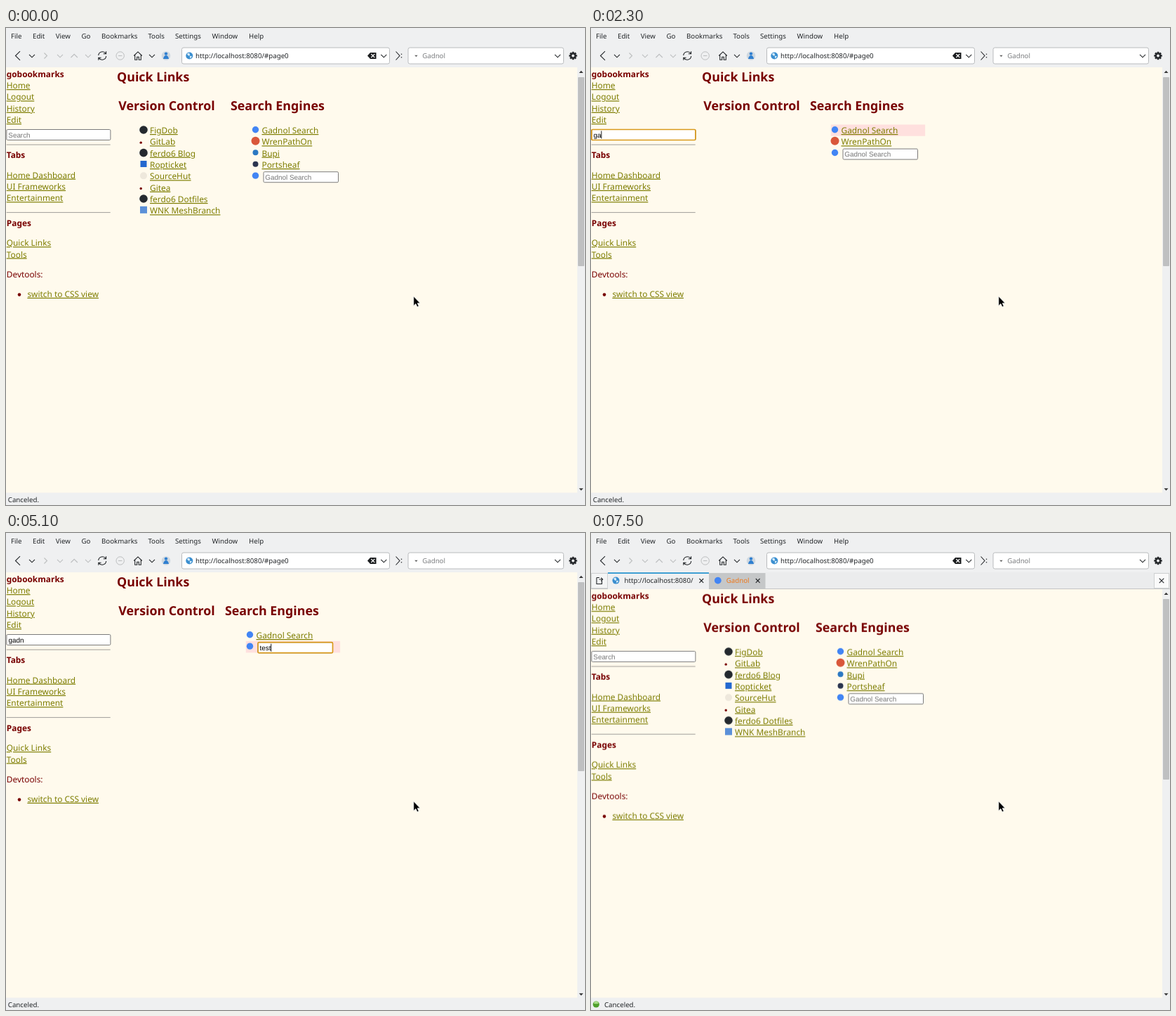
An HTML page that plays this animation: 825x679 px, repeating every 8000 ms.

```html
<!DOCTYPE html>
<html lang="en">
<head>
<meta charset="utf-8">
<title>Bookmark filter</title>
<style>
html, body { margin: 0; width: 100%; height: 100%; overflow: hidden; background: #eff0f1; }
svg { display: block; width: 825px; height: 679px; }
text { font: 11.88px "Noto Sans", sans-serif; fill: #780000; text-rendering: geometricPrecision; white-space: pre; }
.ui { font-size: 9.7px; fill: #232629; }
.hint { fill: #7c7e80; }
.unread { fill: #f07818; }
.key { text-decoration: underline; }
.link { fill: #7d7d00; text-decoration: underline; }
.bold { font-weight: 700; }
.head { font-weight: 700; font-size: 17.82px; }
.type { font: 9.9px "Liberation Sans", Arial, sans-serif; fill: #000; }
.empty { fill: #757575; }
.line { fill: none; stroke: #232629; stroke-width: 1.1; }
.off { stroke: #bcbebf; }
</style>
</head>
<body>
<svg id="stage" viewBox="0 0 825 679"></svg>
<script>
const LOOP = 8000, ROW = 16.335, FIRST = 150, SHIFT = 23.76;
const OPEN = 5400, RESET = 7100;
const steps = [];

// markup helpers
const text = (x, y, s, cls = '') => `<text x="${x}" y="${y}" class="${cls}">${s}</text>`;
const rect = (x, y, w, h, fill, more = '') => `<rect x="${x}" y="${y}" width="${w}" height="${h}" fill="${fill}" ${more}/>`;
const disc = (x, y, r, fill, more = '') => `<circle cx="${x}" cy="${y}" r="${r}" fill="${fill}" ${more}/>`;
const line = (d, cls = '', more = '') => `<path d="${d}" class="line ${cls}" ${more}/>`;
const shape = (d, fill, more = '') => `<path d="${d}" fill="${fill}" ${more}/>`;
const chevron = (x, cls) => line(`M${x - 4} 37.8l4 4l4-4`, cls);
const cross = (x, y, r, cls = '') => line(`M${x - r} ${y - r}l${2 * r} ${2 * r}m0-${2 * r}l-${2 * r} ${2 * r}`, cls);

// a group whose property holds each value from its time on
function timed(body, prop, table) {
  steps.push([prop, table]);
  return `<g data-step="${steps.length - 1}">${body}</g>`;
}
function during(body, ...spans) {
  const table = spans[0] ? [[0, 0]] : [];
  spans.forEach((t, i) => { if (t < LOOP) table.push([t, i % 2 ? 0 : 1]); });
  return timed(body, 'opacity', table);
}

const box = (x, y, w) => rect(x, y, w, 15, '#fff', 'stroke="#7b7b7b" rx="1.5"');
const ring = (x, y, w) => rect(x, y, w, 15, 'none', 'stroke="#d99a1c" stroke-width="1.7" rx="1.5"');
const caret = (x, y, ...spans) => during(rect(x, y, .9, 11, '#000'), ...spans);
const glow = (x, y, w, h) => rect(x, y, w, h, '#ffe0de');
const globe = (x, y) => disc(x, y, 5, '#3b8fd0') +
  shape(`M${x - 3.5} ${y - 2.5}q3-3 4 0t-2 2.5zM${x + .5} ${y + .5}q3-1 3 1l-2.5 2.5z`, '#d5ebf8');

const ICON = {
  fig: y => disc(0, y - 5, 5.8, '#24292f'),
  dot: y => disc(-3.8, y - 3.2, 1.7, '#780000'),
  rope: y => rect(-4.5, y - 10, 9, 9, '#2468cf'),
  pale: y => disc(0, y - 5, 5, '#eee8dc'),
  mesh: y => rect(-5, y - 10.5, 10, 10, '#5b90d8'),
  gad: y => disc(0, y - 5.2, 4.7, '#4285f4'),
  wren: y => disc(0, y - 5.6, 6, '#d9573a'),
  bup: y => disc(0, y - 5.3, 4, '#2b78c2'),
  port: y => disc(0, y - 5.3, 4, '#2b3550')
};
const FIG = ['fig', 'FigDob'], LAB = ['dot', 'GitLab'], BLOG = ['fig', 'ferdo6 Blog'],
  ROPE = ['rope', 'Ropticket'], HUT = ['pale', 'SourceHut'], TEA = ['dot', 'Gitea'],
  DOTS = ['fig', 'ferdo6 Dotfiles'], MESH = ['mesh', 'WNK MeshBranch'];
const GAD = ['gad', 'Gadnol Search'], WREN = ['wren', 'WrenPathOn'], BUP = ['bup', 'Bupi'],
  PORT = ['port', 'Portsheaf'], ASK = ['gad'];

const list = (x, rows) => `<g transform="translate(${x})">` + rows.map(([icon, label], i) => {
  const y = FIRST + ROW * i;
  return ICON[icon](y) + (label ? text(9, y, label, 'link') : box(11.5, y - 10.6, 106.5));
}).join('') + '</g>';
const engines = (x, rows) => text(x - 35.5, 117.4, 'Search Engines', 'head') + list(x, rows);
const prompt = (x, y, ...spans) => during(text(x, y, 'Gadnol Search', 'type empty'), ...spans);

function typing(x, y, table) {
  return table.map(([from, to, s]) => during(text(x, y, s, 'type'), from, to)).join('');
}

function menu() {
  const items = [['File', 7], ['Edit', 38], ['View', 70.7], ['Go', 107.5], ['Bookmarks', 136],
    ['Tools', 202.4], ['Settings', 241], ['Window', 293.5], ['Help', 346]];
  return items.map(([s, x]) => text(x, 15, s, 'ui')).join('') +
    during(items.map(([s, x]) => text(x, 15, s[0], 'ui key')).join(''), 800, 1300);
}

function toolbar() {
  const field = (x, w) => rect(x, 28, w, 23, '#fff', 'stroke="#b9bbbd" rx="2.5"');
  const teeth = [0, 45, 90, 135].map(a =>
    rect(806.7, 33.8, 2.6, 11.4, '#232629', `transform="rotate(${a} 808 39.5)"`)).join('');
  return line('M20 33.2l-6.5 6.3l6.5 6.3') + chevron(37) +
    line('M54.5 35.5l4 4l-4 4', 'off') + chevron(77, 'off') +
    line('M92.5 42l4.7-4.7l4.7 4.7', 'off') + chevron(117, 'off') +
    line('M131.7 39a5.7 5.7 0 0 1 10.5-2.6m.4-3.2v3.6h-3.8M142.7 40a5.7 5.7 0 0 1-10.5 2.6m-.4 3.2v-3.6h3.8', '', 'stroke-width="1.3"') +
    disc(162.7, 39.5, 5.7, 'none', 'stroke="#bcbebf"') + line('M160 39.5h5.4', 'off') +
    line('M182.2 39.5l5.8-5.6l5.8 5.6M183.7 38.5v6.8h3v-4h2.6v4h3v-6.8') + chevron(208) +
    disc(228, 39.5, 6.3, '#cfd8e0') + disc(228, 36.6, 2.2, '#2f7fd0') +
    shape('M224 44q1-5 4-5t4 5z', '#2f7fd0') +
    field(250.5, 296) + globe(261.3, 39.5) + text(270, 43.3, 'http://localhost:8080/#page0', 'ui') +
    shape('M515 39.5l4-4.6h8.5v9.2h-8.5z', '#1b1d1f') +
    line('M520.3 37l5 5m0-5l-5 5', '', 'style="stroke:#fff"') + chevron(538.3) +
    line('M555.5 33.5l5.5 6l-5.5 6') + disc(563.5, 37.3, .8, '#232629') + disc(563.5, 41.7, .8, '#232629') +
    field(573, 221.5) + shape('M582.2 38.7h4.4l-2.2 2.4z', '#555') +
    text(593.2, 43.3, 'Gadnol', 'ui hint') + chevron(786) +
    teeth + disc(808, 39.5, 4.3, '#232629') + disc(808, 39.5, 1.9, '#eff0f1');
}

function sidebar() {
  const links = [['Home', 86.1], ['Logout', 102.4], ['History', 118.8], ['Edit', 135.1],
    ['Home Dashboard', 213.6], ['UI Frameworks', 229.9], ['Entertainment', 246.3],
    ['Quick Links', 310.2], ['Tools', 326.5]];
  const rule = y => rect(.7, y, 148, 1, '#a09e99');
  return text(.75, 69.8, 'gobookmarks', 'bold') + text(.75, 185.3, 'Tabs', 'bold') +
    text(.75, 282, 'Pages', 'bold') + links.map(([s, y]) => text(.75, y, s, 'link')).join('') +
    rule(165.6) + rule(262.1) + text(.75, 354.7, 'Devtools:') +
    disc(19, 379.6, 2.3, '#780000') + text(30.4, 382.9, 'switch to CSS view', 'link') +
    box(.9, 144.5, 148) + during(ring(.9, 144.5, 148), 1300, 4400) +
    during(text(3.3, 155.6, 'Search', 'type empty'), 0, 1800, RESET, LOOP) +
    typing(3.5, 155.6, [[1800, 2100, 'g'], [2100, 3200, 'ga'], [3200, 3400, 'gad'], [3400, RESET, 'gadn']]) +
    [[1300, 1800], [1800, 2100], [2100, 2800], [3200, 3400], [3400, 3900]]
      .map((span, i) => caret(3.4 + 5.5 * i, 146.5, ...span)).join('');
}

function results() {
  const near = 347.5, far = 355.5, all = [GAD, WREN, BUP, PORT, ASK];
  return text(158, 75.7, 'Quick Links', 'head') + text(160.3, 117.4, 'Version Control', 'head') +
    during(list(196, [FIG, LAB, BLOG, ROPE, HUT, TEA, DOTS, MESH]) + engines(far, all) +
      text(369.3, 215.6, 'Gadnol Search', 'type empty'), 0, 1800, RESET, LOOP) +
    during(glow(190.3, 137.5, 107.5, 16.3) + list(196, [FIG, LAB, BLOG, ROPE, TEA, DOTS]) +
      engines(near, all) + text(361.3, 215.6, 'Gadnol Search', 'type empty'), 1800, 2100) +
    during(glow(341.8, 137.5, 134.3, 16.3), 2100, 4200) +
    during(glow(341.8, 153.8, 134.3, 16.6), 4200, RESET) +
    during(engines(near, [GAD, WREN, ASK]) + text(361.3, 183, 'Gadnol Search', 'type empty'), 2100, 3200) +
    during(engines(near, [GAD, ASK]), 3200, RESET) +
    during(ring(359, 155.7, 106.5), 4400, RESET) +
    prompt(361.3, 166.6, 3200, 4900, OPEN, RESET) +
    typing(361.5, 166.6, [[4900, 5000, 'te'], [5000, 5100, 'tes'], [5100, OPEN, 'test']]) +
    caret(361.2, 157.7, 4400, 4900, OPEN, 6100, 6600, RESET) +
    caret(369.8, 157.7, 4900, 5000) + caret(374.7, 157.7, 5000, 5100) + caret(377.3, 157.7, 5100, OPEN);
}

function tabs() {
  return rect(0, 56, 825, 24, '#ebeced') + rect(0, 79, 825, 1, '#c3c5c6') +
    rect(.5, 57.5, 23, 21, '#f4f5f5', 'stroke="#cfd1d2"') +
    line('M8 63.5h4m-4 0v9h7.5v-4.5M11.5 66h5m-2.2-2.4l2.4 2.4l-2.4 2.4') +
    rect(24, 57, 144, 23, '#eff0f1') + rect(24, 56, 144, 2, '#3f9fd3') +
    globe(35.5, 67.6) + text(47.5, 71.4, 'http://localhost:8080/', 'ui') + cross(157.3, 67.9, 2.9) +
    rect(168, 57, 80.5, 22, '#c5c7c8') + disc(180.8, 67.6, 4.9, '#4285f4') +
    text(192.8, 71.4, 'Gadnol', 'ui unread') + cross(237.7, 67.9, 2.9) +
    rect(802.5, 57.5, 21, 21, '#fafafa', 'stroke="#cfd1d2"') + cross(813, 67.9, 3.3);
}

function scrollbar() {
  const bar = (top, h) => rect(814, top, 11, 661.5 - top, '#eff0f1') +
    shape(`M816.5 ${top + 8}h6l-3-3.2z`, '#333') +
    rect(815, top + 14, 9, h, '#bfc0c1', 'rx="1"');
  return during(bar(56, 269), 0, OPEN) + during(bar(80, 257), OPEN, LOOP) +
    shape('M816.5 655.3h6l-3 3.2z', '#333');
}

function status() {
  return during(text(2.8, 674.7, 'Canceled.', 'ui'), 0, OPEN) +
    during(disc(7.3, 671, 4.6, '#4f9f2c') + shape('M3.8 669.5a3.6 3.6 0 0 1 7 0q-3.5 1.7-7 0z', '#a8dc86') +
      text(19, 674.7, 'Canceled.', 'ui'), OPEN, LOOP);
}

const pointer = shape('M580.8 382v13.4l3.1-2.8l2 4.5l2.3-1l-2-4.3h3.9z', '#000', 'stroke="#fff" stroke-width=".7"');

const stage = document.getElementById('stage');
stage.innerHTML = rect(0, 0, 825, 679, '#eff0f1') + menu() + toolbar() +
  rect(0, 56, 814, 605.5, '#fffaed') +
  timed(sidebar() + results(), 'transform', [[0, 'translateY(0px)'], [OPEN, `translateY(${SHIFT}px)`]]) +
  during(tabs(), OPEN, LOOP) + scrollbar() + status() + pointer;

stage.querySelectorAll('[data-step]').forEach(el => {
  const [prop, table] = steps[el.dataset.step];
  const frames = [...table, [LOOP, table.at(-1)[1]]].map(([t, v]) =>
    ({ offset: t / LOOP, [prop]: v, easing: 'steps(1, end)' }));
  el.animate(frames, { duration: LOOP, iterations: Infinity });
});
</script>
</body>
</html>
```
